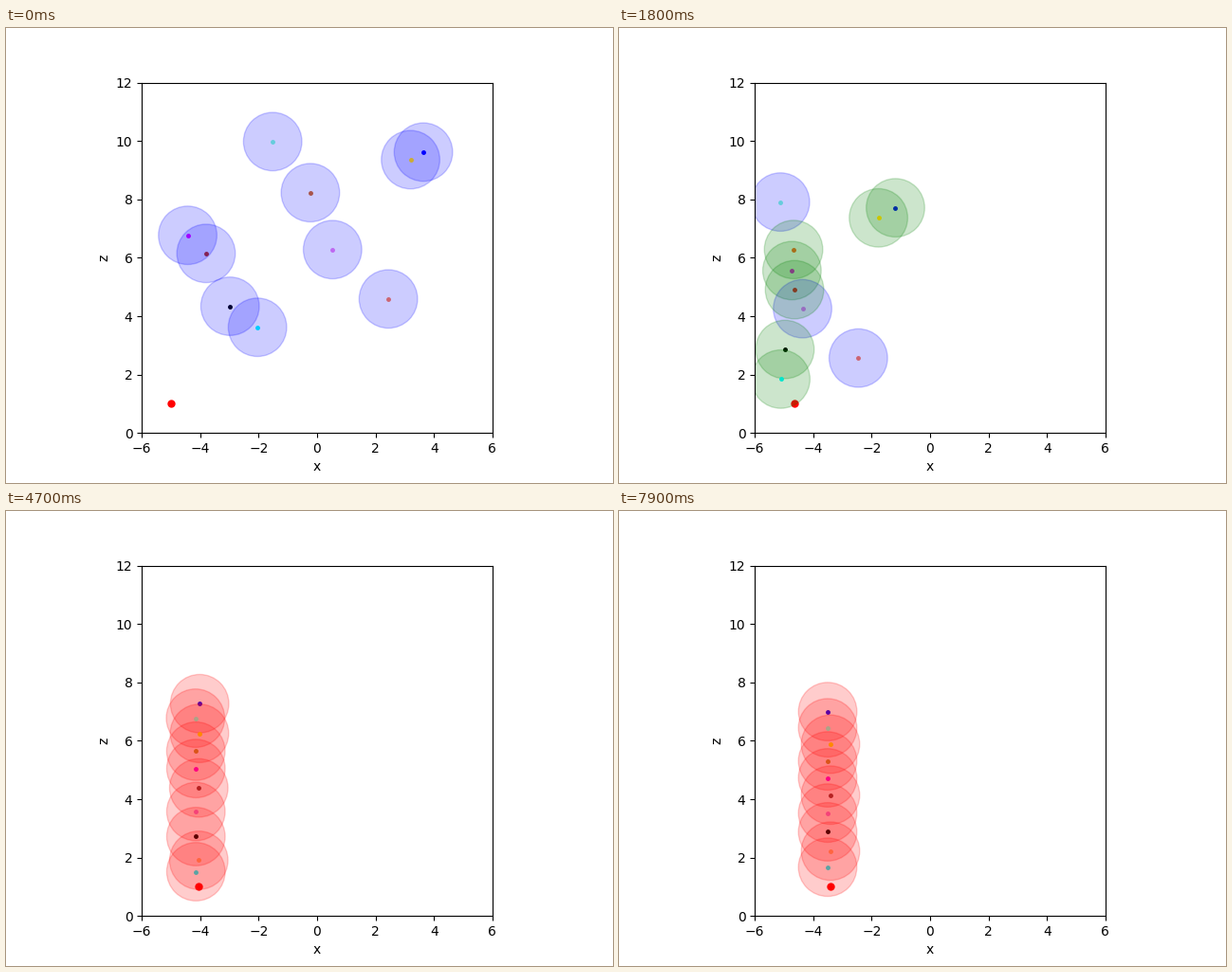
Animation, 640 px wide and 480 px high, one loop 8000 ms. Source, as a matplotlib script:

```python
import matplotlib.pyplot as plt
import numpy as np
from matplotlib.animation import FuncAnimation
from matplotlib.patches import Circle

FRAMES, INTERVAL = 80, 100
SPEED, ACCEL, SINK = 0.2, 0.008, 0.1125    # shared drift of searching agents
LEAD = 0.02                                # leader's speed

steps = np.arange(FRAMES)
lead_x = -5 + LEAD * steps

fig, ax = plt.subplots(figsize=(6.4, 4.8), dpi=100)
ax.set_aspect("equal")
ax.set(xlim=(-6, 6), ylim=(0, 12), xlabel="x", ylabel="z")

leader, = ax.plot([], [], "o", ms=5, color="red", zorder=1)


def slot_offset(n):
    """Sideways offset of place n in the line behind the leader."""
    return -0.055 + 0.065 * np.cos(2 * np.pi * (n - 2) / 3)


def slot_height(n):
    """Height of place n over time: stretched at first, then evening out."""
    stretch = 0.29 * np.tanh((n - 4.3) / 1.3)
    settle = np.exp(-np.maximum(steps - 47, 0) / 14)
    return 1.02 + 0.636 * n - 0.0041 * n * n + stretch * settle


def damped(d, v, a, b, t):
    """Overdamped spring from gap d and velocity v, with decay rates a < b."""
    slow = (v + b * d) / (b - a)
    return slow * np.exp(-a * t) + (d - slow) * np.exp(-b * t)


def critical(d, v, w, t):
    """Critically damped spring from gap d and velocity v."""
    return (d + (v + w * d) * t) * np.exp(-w * t)


class Agent:
    """Drifts while searching, then springs into its place in the line."""

    def __init__(self, color, x, z, slot, turn, group=None):
        drift_x = x - SPEED * steps - ACCEL / 2 * steps ** 2
        drift_z = z - SINK * steps
        goal_x = lead_x + slot_offset(slot)
        goal_z = slot_height(slot)
        t = np.maximum(steps - turn, 0)

        # places further up the line react more slowly sideways
        gap_x = critical(drift_x[turn] - goal_x[turn],
                         -SPEED - ACCEL * turn - LEAD, 0.45 - 0.03 * slot, t)
        gap_z = damped(drift_z[turn] - goal_z[turn], -SINK,
                       1 / (30 - 2.2 * slot), 1 / 3, t)
        self.x = np.where(steps < turn, drift_x, goal_x + gap_x)
        self.z = np.where(steps < turn, drift_z, goal_z + gap_z)

        self.group = group or turn + 1
        self.line = 24 if slot < 4 else 34 + slot
        self.dot, = ax.plot([], [], ".", ms=5, color=color, zorder=1)
        self.disc = ax.add_patch(Circle((x, z), 1, alpha=0.2))

    def update(self, k):
        self.dot.set_data([self.x[k]], [self.z[k]])
        self.disc.center = self.x[k], self.z[k]
        self.disc.set_color("r" if k >= self.line else
                            "g" if k >= self.group else "b")


agents = [
    Agent("blue", 3.64, 9.62, slot=10, turn=14),
    Agent("aquamarine", -1.52, 9.98, slot=9, turn=12, group=20),
    Agent("gold", 3.20, 9.36, slot=8, turn=14),
    Agent("magenta", -4.43, 6.77, slot=6, turn=0),
    Agent("chocolate", -0.23, 8.23, slot=7, turn=15),
    Agent("violet", 0.53, 6.28, slot=4, turn=18),
    Agent("brown", -3.80, 6.15, slot=5, turn=3),
    Agent("black", -2.98, 4.34, slot=3, turn=10),
    Agent("cyan", -2.04, 3.62, slot=1, turn=13),
    Agent("coral", 2.44, 4.59, slot=2, turn=22),
]


def update(k):
    leader.set_data([lead_x[k]], [1])
    for agent in agents:
        agent.update(k)


anim = FuncAnimation(fig, update, frames=FRAMES, interval=INTERVAL,
                     repeat=True, repeat_delay=0)
plt.show()
```
